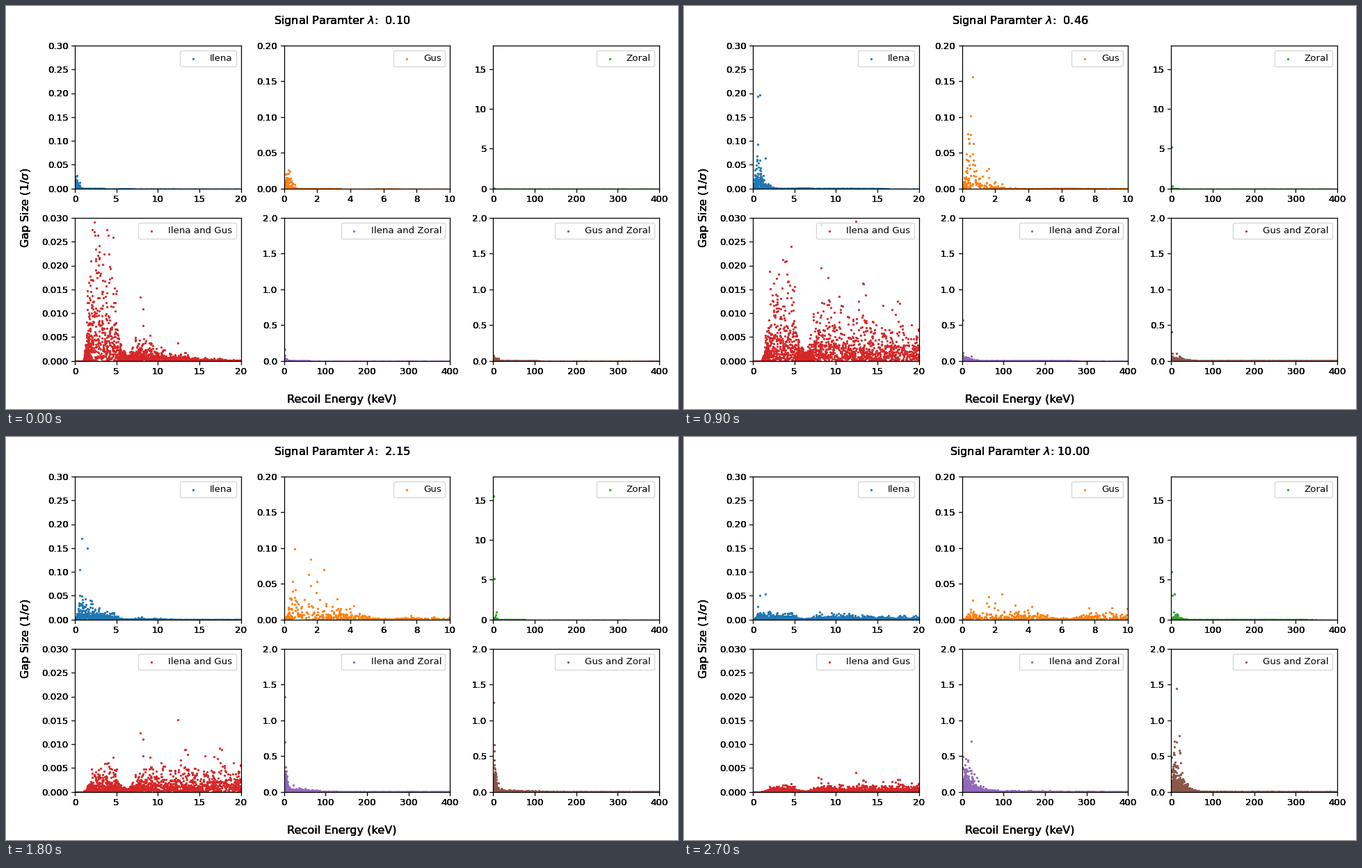
Write a matplotlib script that moves like this. It is 966x580 px and loops after 3000 ms.

```python
import numpy as np
import matplotlib.pyplot as plt
from matplotlib.animation import FuncAnimation

W, H, DPI = 966, 580, 96
AX_W, AX_H = 238.6, 205.5
LEFT, TOP, PITCH_X, PITCH_Y = 98.9, 57, 300.7, 248
LAMBDAS = np.logspace(-1, 1, 10)

plt.rcParams.update({"font.family": "DejaVu Sans", "font.size": 10.06})

A, B, C = "Ilena", "Gus", "Zoral"


def ramp(x, start, width):
    return np.clip((x - start) / width, 0, 1) ** 2


def dipped(x):
    """Slowly growing level with a flat-bottomed dip around 6 keV."""
    return (0.038 + 0.0025 * x) * (1 - 0.88 * np.exp(-((x - 6.2) / 1.15) ** 4))


def capped(x, slope, top):
    return np.minimum(slope * x, top) * ramp(x, 0.8, 1.3)


# mean: typical gap weight at an energy; peaks: the few largest (energy, weight)
# terms: (scale, decay) of the exponential signals; spread: relative gap width
PANELS = [
    dict(label=A, xmax=20, ymax=0.30, count=2000, terms=[(1, 0.94)], spread=0.02,
         mean=lambda x: dipped(x) * ramp(x, 0, 0.6),
         peaks=[(0.58, 0.29), (0.88, 0.54), (1.5, 0.62)]),
    dict(label=B, xmax=10, ymax=0.20, count=800, terms=[(1, 0.98)], spread=0.02,
         mean=lambda x: 1.2 * dipped(x) * ramp(x, 0, 0.5),
         peaks=[(0.65, 0.286), (1.6, 0.375), (2.4, 0.445)]),
    dict(label=C, xmax=400, ymax=18, count=900, terms=[(1, 0.98)], spread=0.2,
         mean=lambda x: 6 * ramp(x, 1.5, 3.5),
         peaks=[(1.63, 70), (2.85, 40), (8, 70)]),
    dict(label=f"{A} and {B}", xmax=20, ymax=0.030, count=3200,
         terms=[(1, 0.0433)], spread=0.39,
         mean=lambda x: dipped(x) / 15.7 * ramp(x, 1, 1.2),
         peaks=[(7.9, 0.031), (8.2, 0.028), (12.4, 0.0417)]),
    dict(label=f"{A} and {C}", xmax=400, ymax=2.0, count=2600,
         terms=[(1, 0.87), (0.0065, 0.05)], spread=0.02,
         mean=lambda x: capped(x, 0.22, 8),
         peaks=[(1.7, 5.63), (2.6, 4.2), (23, 50)]),
    dict(label=f"{B} and {C}", xmax=400, ymax=2.0, count=2800,
         terms=[(1, 0.95), (0.002, 0.027)], spread=0.02,
         mean=lambda x: capped(x, 0.34, 9),
         peaks=[(1.7, 5.7), (12.5, 47), (19, 47)]),
]


def random_gaps(panel, rng):
    """Scatter gaps along the energy axis, denser where they are small."""
    grid = np.linspace(0, panel["xmax"], 4000)
    mean = panel["mean"](grid)
    density = np.cumsum(1 / (mean + 0.1 * mean.mean()))
    x = np.interp(rng.random(panel["count"]), density / density[-1], grid)
    weight = panel["mean"](x) * np.minimum(rng.exponential(size=x.size), 5.5)
    return np.column_stack([(x, weight), np.transpose(panel["peaks"])])


def gap_size(panel, lam):
    x, weight = panel["gaps"]
    y = np.zeros_like(x)
    for scale, decay in panel["terms"]:
        mid = decay * x
        half = panel["spread"] * mid + 1e-9
        y += scale * (np.exp(-(mid - half) / lam) - np.exp(-(mid + half) / lam)) / (2 * half)
    y *= weight
    # vanishing gaps sit one pixel row below the tiny ones
    pixel = panel["ymax"] / AX_H
    resting = np.where(y > 1e-14 * panel["ymax"], -0.75, -1.25) * pixel
    return np.where(y > pixel / 2, y, resting)


def darken(artist, passes=4):
    """Draw an artist several times over so its soft edges turn dark."""
    draw = artist.draw

    def draw_repeatedly(renderer):
        for _ in range(passes):
            draw(renderer)

    artist.draw = draw_repeatedly


fig = plt.figure(figsize=(W / DPI, H / DPI), dpi=DPI)
rng = np.random.default_rng(12)
for i, panel in enumerate(PANELS):
    row, col = divmod(i, 3)
    bottom = H - (TOP + row * PITCH_Y + AX_H)
    ax = fig.add_axes([(LEFT + col * PITCH_X) / W, bottom / H, AX_W / W, AX_H / H])
    ax.set(xlim=(0, panel["xmax"]), ylim=(0, panel["ymax"]))
    panel["gaps"] = random_gaps(panel, rng)
    panel["dots"] = ax.scatter([], [], s=2, color=f"C{i}", label=panel["label"])
    ax.legend(loc="upper right")
    for part in (ax.xaxis, ax.yaxis, *ax.spines.values()):
        darken(part)

title = fig.suptitle("")
for text in (title, fig.supxlabel("Recoil Energy (keV)"),
             fig.supylabel(r"Gap Size (1/$\sigma$)")):
    darken(text)


def update(frame):
    lam = LAMBDAS[frame]
    title.set_text(rf"Signal Paramter $\lambda$: {lam:5.2f}")
    for panel in PANELS:
        panel["dots"].set_offsets(np.column_stack([panel["gaps"][0], gap_size(panel, lam)]))
    return [title] + [panel["dots"] for panel in PANELS]


anim = FuncAnimation(fig, update, frames=len(LAMBDAS), interval=300,
                     repeat=True, repeat_delay=0, blit=False)
plt.show()
```
